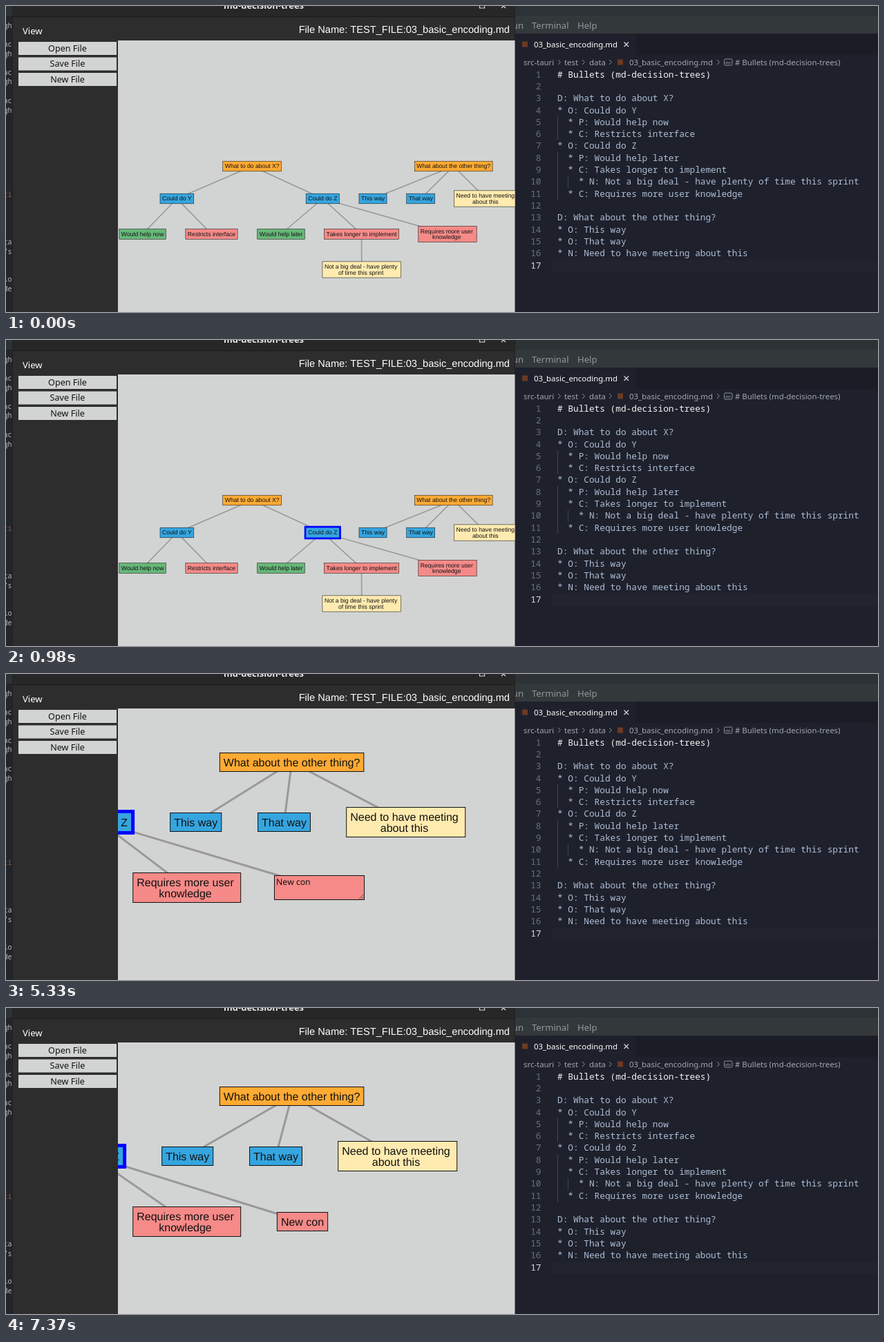
Animation of 1262 by 444 pixels, one loop 8000 ms. Source, as an HTML page:

```html
<!DOCTYPE html>
<html lang="en">
<head>
<meta charset="utf-8">
<title>md-decision-trees</title>
<style>
  html, body { margin: 0; width: 100%; height: 100%; overflow: hidden; background: #1e212b; }
  svg { display: block; }
  text { white-space: pre; }
  .ui { font-family: "Noto Sans", "Open Sans", sans-serif; font-size: 12.6px; }
  .crumb { font-size: 11.4px; fill: #a3a7ae; }
  .mono { font-family: "Noto Sans Mono", "DejaVu Sans Mono", monospace; font-size: 12.77px; }
  .tree { font-family: "Liberation Sans", Arial, sans-serif; font-size: 16px; font-kerning: none; text-rendering: geometricPrecision; }
  .mid { text-anchor: middle; }
  .end { text-anchor: end; }
</style>
</head>
<body>
<svg width="1262" height="444" viewBox="0 0 1262 444">
  <!-- code editor -->
  <rect width="1262" height="444" fill="#1e212b"/>
  <rect x="736" width="526" height="14" fill="#2c3236"/>
  <rect x="736" y="14" width="526" height="26" fill="#33383b"/>
  <rect x="736" y="40" width="526" height="31" fill="#1b1d26"/>
  <rect x="736" y="40" width="175" height="31" fill="#1e212b"/>
  <rect x="790" y="369" width="472" height="16.5" fill="#21242e"/>
  <g class="ui">
    <g fill="#92979b" style="font-size:13.1px">
      <text x="749" y="32.5" class="end">Run</text>
      <text x="761" y="32.5">Terminal</text>
      <text x="827" y="32.5">Help</text>
    </g>
    <text x="764" y="60" class="crumb" style="fill:#fff">03_basic_encoding.md</text>
    <g class="crumb">
      <text x="749" y="85.5">src-tauri</text>
      <text x="808" y="85.5">test</text>
      <text x="844" y="85.5">data</text>
      <text x="902" y="85.5">03_basic_encoding.md</text>
      <text x="1055" y="85.5"># Bullets (md-decision-trees)</text>
      <text x="1045" y="83.5" class="mid" style="font-size:5px">abc</text>
    </g>
  </g>
  <path d="M747 51.500h8v8h-8zM885 77.500h8v8h-8z" fill="#6b3a24"/>
  <path d="M894.500 52.500l6.500 6.500m0-6.500l-6.500 6.500" stroke="#d5d7db" stroke-width="1.200"/>
  <g fill="none" stroke="#8d9299">
    <path d="M799 78l3.500 3.500l-3.500 3.500M834 78l3.500 3.500l-3.500 3.500M873 78l3.500 3.500l-3.500 3.500M1029 78l3.500 3.500l-3.500 3.500"/>
    <rect x="1039.500" y="77" width="11.500" height="9" rx="1.500"/>
    <path d="M798.500 160v34M798.500 212v69M813.500 247v17" stroke="#344b58"/>
  </g>
  <g id="code" class="mono"></g>

  <!-- terminal behind the window -->
  <rect width="9" height="444" fill="#22252a"/>
  <rect width="9" height="14" fill="#2c3236"/>
  <g id="strip" class="mono end" style="font-size:10px"></g>

  <!-- application window -->
  <rect x="9" width="728" height="444" fill="#2d2d2d"/>
  <rect x="9" width="728" height="15" fill="#272727"/>
  <path d="M9 15.500H737" stroke="#1c1c1c"/>
  <path d="M9.500 0V444M736.500 0V444" stroke="#202123"/>
  <path d="M685.500 0V3H692.500V0M717 3l3-3l3 3" fill="none" stroke="#dedede" stroke-width="1.200"/>
  <g class="ui" fill="#e8e8e8">
    <text x="373" y="4" class="mid" style="font-size:13px;font-weight:700">md-decision-trees</text>
    <text x="24" y="40.500" style="font-size:13.1px" fill="#fff">View</text>
    <path d="M18 52h142v19H18zM18 74.500h142v19H18zM18 97h142v19H18z" fill="#d2d4d3"/>
    <g class="mid" fill="#111">
      <text x="89" y="65.500">Open File</text>
      <text x="89" y="88">Save File</text>
      <text x="89" y="110.500">New File</text>
    </g>
  </g>
  <text x="729" y="39" class="tree end" style="font-size:14.62px" fill="#fff">File Name: TEST_FILE:03_basic_encoding.md</text>
  <svg x="162" y="50" width="574.5" height="394" viewBox="162 50 574.5 394">
    <rect x="162" y="50" width="575" height="394" fill="#d2d4d3"/>
    <g id="tree" class="tree"></g>
  </svg>
</svg>
<script>
const $ = id => document.getElementById(id);
const LOOP = 8000, ZOOM = 0.541;
const FILL = { D: '#ffaa33', O: '#35a5df', P: '#67b779', C: '#f58a88', N: '#ffebaf' };

$('code').innerHTML = `# Bullets (md-decision-trees)

D: What to do about X?
* O: Could do Y
  * P: Would help now
  * C: Restricts interface
* O: Could do Z
  * P: Would help later
  * C: Takes longer to implement
    * N: Not a big deal - have plenty of time this sprint
  * C: Requires more user knowledge

D: What about the other thing?
* O: This way
* O: That way
* N: Need to have meeting about this
`.split('\n').map((line, i) => {
  const y = 103.6 + 17.31 * i;
  return `<text class="end" x="774.5" y="${y}" fill="${i == 16 ? '#dadde2' : '#697180'}">${i + 1}</text>
    <text x="798" y="${y}" fill="${i ? '#aebdd6' : '#f2f3f5'}">${line}</text>`;
}).join('');

$('strip').innerHTML = [[32, 'gh'], [59, 'ac'], [73, 'gh'], [100, 'ac'], [113, 'gh'], [141, 'ac'], [155, 'gh'],
  [277, 'ci'], [346, 'ta'], [360, '/s'], [400, 'lo'], [414, 'de']]
  .map(([y, s]) => `<text x="8.5" y="${y}" fill="${s == 'ci' ? '#8a5a3c' : '#b5b8bc'}">${s}</text>`).join('');

const pen = document.createElement('canvas').getContext('2d');
pen.font = '16px "Liberation Sans", Arial, sans-serif';
pen.fontKerning = 'none';

// A node is [kind, label, centre x, centre y, parent index]; wrapped lines keep their trailing space.
function drawNode([kind, label, x, y], zoom, selected) {
  const lines = label.split('|');
  const border = selected ? 5 : 1;
  const w = Math.max(...lines.map(s => pen.measureText(s).width)) + 10 + border;
  const h = lines.length * 16 + 10 + border;
  const text = lines.map((s, i) =>
    `<text class="mid" y="${16 * (i - lines.length / 2) + 13.5}" fill="#111">${s}</text>`).join('');
  return `<g transform="translate(${x} ${y}) scale(${zoom})">
    <rect x="${-w / 2}" y="${-h / 2}" width="${w}" height="${h}" fill="${FILL[kind]}"
      stroke="${selected ? '#00f' : '#111'}" stroke-width="${border}"/>${text}</g>`;
}

function drawTree(nodes, zoom, selected) {
  const links = nodes.filter(n => n[4] != null).map(n => {
    const p = nodes[n[4]];
    return `M${p[2]} ${p[3]}L${n[2]} ${n[3]}`;
  }).join('');
  return `<path d="${links}" stroke="#999" stroke-width="${3 * zoom}"/>` +
    nodes.map((n, i) => drawNode(n, zoom, i == selected)).join('');
}

const overview = [
  ['D', 'What to do about X?', 356.2, 232.5],
  ['O', 'Could do Y', 247.4, 279.5, 0],
  ['O', 'Could do Z', 458.3, 279.5, 0],
  ['P', 'Would help now', 197.6, 331, 1],
  ['C', 'Restricts interface', 297.5, 331, 1],
  ['P', 'Would help later', 398, 331, 2],
  ['C', 'Takes longer to implement', 514.5, 331, 2],
  ['C', 'Requires more user |knowledge ', 639, 331, 2],
  ['N', 'Not a big deal - have plenty |of time this sprint ', 514.8, 382.5, 6],
  ['D', 'What about the other thing?', 647.7, 232.5],
  ['O', 'This way', 531, 279.5, 9],
  ['O', 'That way', 600.2, 279.5, 9],
  ['N', 'Need to have meeting |about this ', 695, 279.5, 9]
];

function closeUp(shift, child) {
  return [
    ['O', 'Could do Z', 137 - shift, 215],
    ['C', 'Requires more user |knowledge ', 261.7, 310, 0],
    ['C', child, child ? 429 : 453.5, 310, 0],
    ['D', 'What about the other thing?', 413.6, 128],
    ['O', 'This way', 274.7, 215, 3],
    ['O', 'That way', 402.5, 215, 3],
    ['N', 'Need to have meeting |about this ', 578.7, 215, 3]
  ].map((n, i) => (i > 3 ? n[2] -= shift : 0, n));
}

const picks = [[0, -1], [130, 0], [260, 1], [530, 3], [720, 1], [980, 2]];
const keys = [3430, 3630, 3960, 4090, 4480, 4610, 4740];
const caretX = [391.5, 400.5, 407.5, 417.5, 420.5, 426.5, 434.5, 441.5];

function drawInput(count, caret) {
  return `<rect x="388.5" y="292.5" width="130" height="35" fill="${FILL.C}" stroke="#111"/>
    <path d="M511 326.500l6.500-6.500M514.500 326.500l3-3" stroke="#5b3a3a"/>
    <text class="ui" style="font-size:12.2px" x="391" y="306" fill="#111">${'New con'.slice(0, count)}</text>` +
    (caret ? `<path d="M${caretX[count]} 295V309" stroke="#111"/>` : '');
}

let shown;
function frame(now) {
  const t = now % LOOP;
  const pick = picks.filter(p => p[0] <= t).pop()[1];
  const typed = keys.filter(k => k <= t).length;
  const caret = t < 5330 || t >= 5990 && t < 6580;
  const stage = t < 2900 ? 0 : t < 7110 ? 1 : 2;
  const state = [stage, pick, typed, caret].join();
  if (state != shown) {
    shown = state;
    $('tree').innerHTML =
      stage == 0 ? drawTree(overview, ZOOM, pick) :
      stage == 1 ? drawTree(closeUp(0, ''), 1, 0) + drawInput(typed, caret) :
      drawTree(closeUp(12, 'New con'), 1, 0);
  }
  requestAnimationFrame(frame);
}
frame(0);
</script>
</body>
</html>
```
